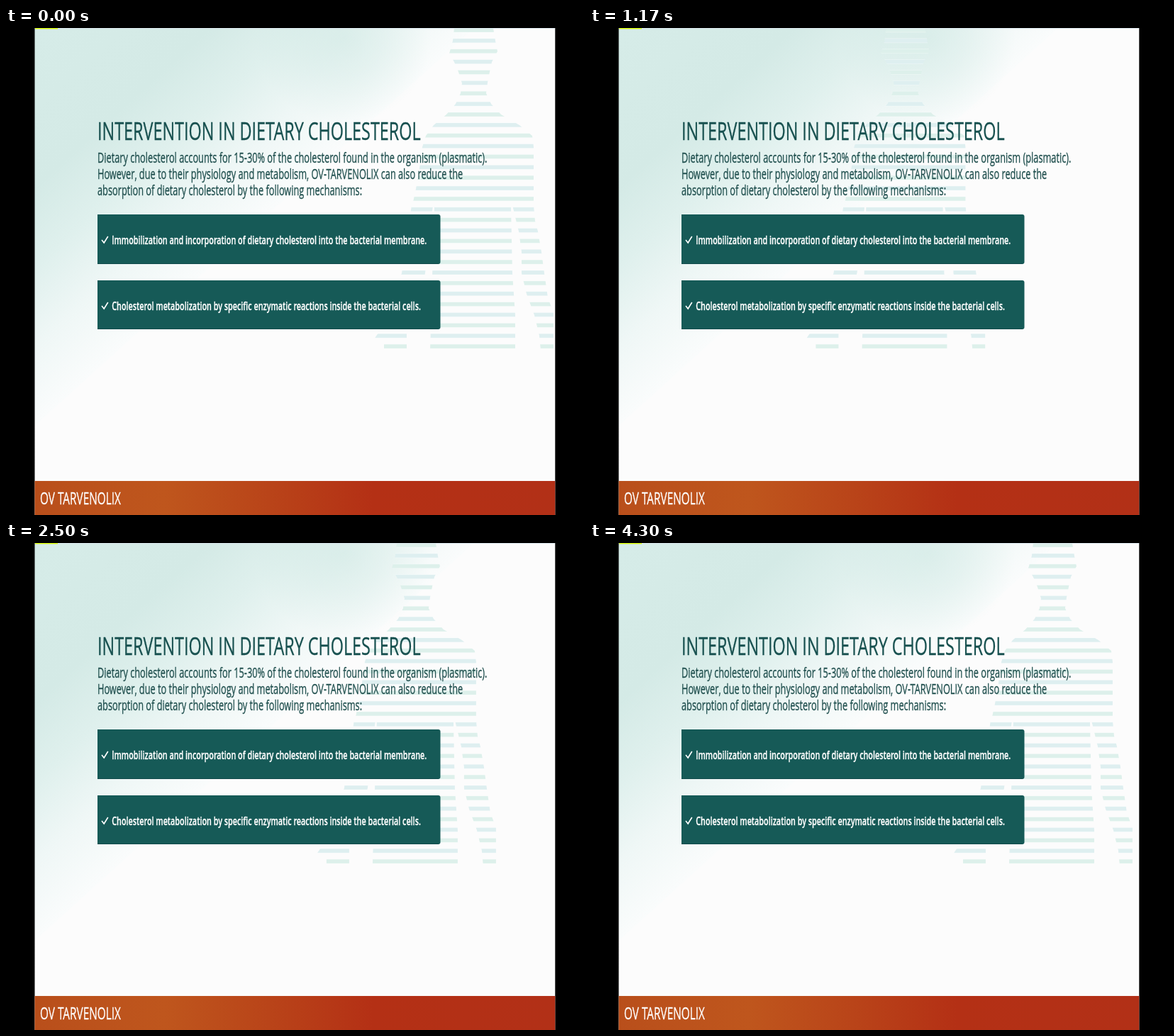
An HTML page for the animation above (4330 ms loop, 815 by 687 pixels).

```html
<!DOCTYPE html>
<html lang="en">
<head>
<meta charset="utf-8">
<title>Dietary cholesterol</title>
<style>
  html, body { margin: 0; width: 100%; height: 100%; overflow: hidden; background: #000; }
  svg { display: block; width: 815px; height: 687px; }
  text { font-family: "Open Sans", "Noto Sans", sans-serif; stroke-width: .35px; }
  .title { font-size: 34.9px; fill: #17504f; stroke: #17504f; }
  .body { font-size: 19.05px; fill: #21504f; stroke: #21504f; }
  .point { font-size: 16.12px; font-weight: 600; fill: #fff; stroke: #fff; }
  .brand { font-size: 22.9px; fill: #fff; stroke: #fff; }
  .tick { fill: none; stroke: #fff; stroke-width: 1.6; }
</style>
</head>
<body>
<svg viewBox="0 0 815 687">
  <defs>
    <linearGradient id="wash" gradientUnits="userSpaceOnUse" x1="41" y1="0" x2="320" y2="308">
      <stop offset="0" stop-color="#d6ece8"/>
      <stop offset=".4" stop-color="#d4eae6"/>
      <stop offset=".6" stop-color="#dff0ed"/>
      <stop offset=".8" stop-color="#eff7f6"/>
      <stop offset="1" stop-color="#fafcfc"/>
      <stop offset="1.1" stop-color="#fcfcfc"/>
    </linearGradient>
    <radialGradient id="glow">
      <stop offset="0" stop-color="#d0e9e4" stop-opacity=".6"/>
      <stop offset=".45" stop-color="#d0e9e4" stop-opacity=".38"/>
      <stop offset="1" stop-color="#d0e9e4" stop-opacity="0"/>
    </radialGradient>
    <linearGradient id="rust">
      <stop offset="0" stop-color="#b94f1b"/>
      <stop offset=".25" stop-color="#bf561d"/>
      <stop offset=".45" stop-color="#b94419"/>
      <stop offset=".65" stop-color="#b43015"/>
      <stop offset="1" stop-color="#b23017"/>
    </linearGradient>
    <clipPath id="slide"><rect x="40.5" width="733.8" height="639"/></clipPath>
    <clipPath id="person">
      <polygon points="632,0 630,18 625,36 632,48 638,62 643,78 641,92 634,107 621,122 603,137 592,152 587,168 583,198 578,227 573,250 744,250 744,168 742,152 724,137 698,122 684,107 677,92 679,77 682,62 685,48 693,33 690,18 687,0"/>
      <polygon points="604,250 712,250 714,346 718,405 718,455 598,455"/>
      <polygon points="572,250 602,250 591,346 565,430 565,455 533,455 533,442 519,439 525,430 558,346"/>
      <polygon points="714,250 744,250 746,272 750,287 755,316 759,346 764,380 772,402 772,455 754,455 752,434 745,405 734,375 727,346 727,316 723,287"/>
    </clipPath>
  </defs>
  <rect width="815" height="687"/>
  <rect x="40.5" width="733.8" height="687" fill="url(#wash)"/>
  <g clip-path="url(#slide)">
    <ellipse cx="475" cy="15" rx="125" ry="120" fill="url(#glow)"/>
    <g id="figure"><g id="bars" clip-path="url(#person)"></g></g>
  </g>
  <rect x="41" width="733" height="1" fill="#d3dfe6"/>
  <rect x="41" width="32" height="1.4" fill="#d5f500"/>
  <g id="copy"></g>
  <rect x="40.5" y="639" width="733.8" height="48" fill="url(#rust)"/>
  <g id="footer"></g>
</svg>
<script>
const LOOP = 4330, STEP = LOOP / 130, SQUEEZE = 0.67;
const $ = id => document.getElementById(id);

function add(parent, tag, attrs, content = "") {
  const el = document.createElementNS("http://www.w3.org/2000/svg", tag);
  for (const key in attrs) el.setAttribute(key, attrs[key]);
  el.textContent = content;
  parent.append(el);
}

// The whole slide is squeezed sideways, so all lettering shares one scale.
function write(parent, kind, x, y, words) {
  add(parent, "text", { class: kind, transform: `translate(${x} ${y}) scale(${SQUEEZE} 1)` }, words);
}

function point(y, height, words) {
  const mid = y + 36;
  add($("copy"), "path", {
    d: `M129 ${y}H609.5q3 0 3 3V${y + height - 3}q0 3 -3 3H129Z`, fill: "#165a57"
  });
  add($("copy"), "path", { d: `M129 ${y + height - 0.5}H610`, stroke: "#104a4b" });
  add($("copy"), "path", { class: "tick", d: `M135 ${mid}l3.2 4l5.6 -9` });
  write($("copy"), "point", 149.2, y + 41.5, words);
}

for (let row = 0; row <= 30; row++) {
  add($("bars"), "rect", {
    x: 510, y: row * 14.87, width: 270, height: 6,
    fill: row % 2 ? "#deeff0" : "#ddf0eb",
    stroke: "#fff", "stroke-opacity": 0.4, "stroke-width": 0.7
  });
}

write($("copy"), "title", 129, 158, "INTERVENTION IN DIETARY CHOLESTEROL");
[
  "Dietary cholesterol accounts for 15-30% of the cholesterol found in the organism (plasmatic).",
  "However, due to their physiology and metabolism, OV-TARVENOLIX can also reduce the",
  "absorption of dietary cholesterol by the following mechanisms:"
].forEach((line, i) => write($("copy"), "body", 129, 190 + i * 23, line));
point(263, 70, "Immobilization and incorporation of dietary cholesterol into the bacterial membrane.");
point(356, 69, "Cholesterol metabolization by specific enzymatic reactions inside the bacterial cells.");
write($("footer"), "brand", 48, 672, "OV TARVENOLIX");

// Time and cube root of the distance left to travel: a cubic ease-out.
const path = [
  [0, 1.442], [430, 1], [499, 1], [499, 6.85], [1170, 6.009], [2040, 4.973],
  [3000, 3.733], [3700, 2.884], [4300, 2.154], [LOOP, 2.12]
];

function offset(t) {
  const i = path.findIndex(p => p[0] > t);
  const [t0, r0] = path[i - 1], [t1, r1] = path[i];
  return 3 - (r0 + (r1 - r0) * (t - t0) / (t1 - t0)) ** 3;
}

const start = performance.now();
function draw() {
  const t = (performance.now() - start) % LOOP;
  const held = Math.floor(t / STEP) * STEP;
  $("figure").setAttribute("transform", `translate(${offset(held).toFixed(2)} 0)`);
  requestAnimationFrame(draw);
}
draw();
</script>
</body>
</html>
```
